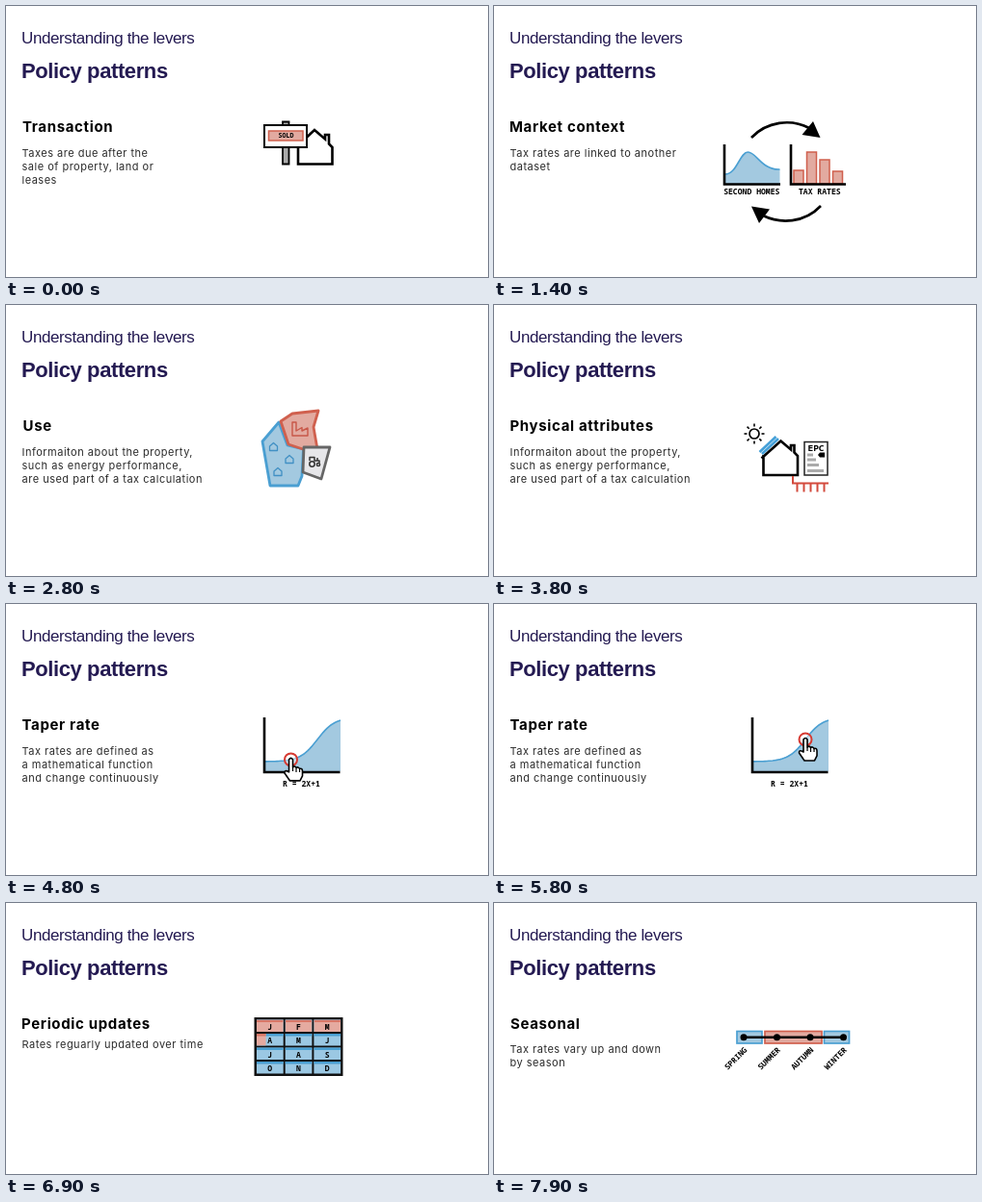
These frames come from a looping animation (500 px wide and 282 px high, 8000 ms). An HTML page:

```html
<!DOCTYPE html>
<html lang="en">
<head>
<meta charset="utf-8">
<title>Policy patterns</title>
<style>
  html, body { margin: 0; width: 100%; height: 100%; overflow: hidden; background: #fff; }
  svg { display: block; width: 100vw; height: 100vh; }
  .intro { font: 17px "Liberation Sans", Arial, sans-serif; letter-spacing: -.4px; fill: #241a52; }
  .main { font: bold 22px "Liberation Sans", Arial, sans-serif; letter-spacing: -.4px; fill: #241a52; }
  .title { font: bold 15px Inter, sans-serif; letter-spacing: .65px; }
  .body { font: 11px Inter, sans-serif; letter-spacing: .5px; fill: #2b2b2b; }
  .mono { font: bold 8.1px "Noto Sans Mono", "DejaVu Sans Mono", monospace; text-anchor: middle; }
  .line { fill: none; stroke: #000; stroke-width: 2.6; }
  .blue { fill: #a3c9e0; stroke: #4a9fd2; }
  .red { fill: #e2aaa0; stroke: #d0604e; }
</style>
</head>
<body>
<svg viewBox="0 0 500 282">
  <text class="intro" x="16" y="39">Understanding the levers</text>
  <text class="main" x="16" y="75">Policy patterns</text>
  <text class="title" id="title" y="130.5"></text>
  <g class="body" id="body"></g>

  <g class="art">
    <path class="line" d="M303 146V164.5H338.5V147L335 143.5V134H331V138.500L320 129L311 137.500"/>
    <path d="M287 120.500H293.500V164.500H287Z" fill="#aaa" stroke="#000" stroke-width="1.8"/>
    <rect x="268" y="124" width="44" height="23" fill="#fff" stroke="#000" stroke-width="2"/>
    <rect class="red" x="272.5" y="130" width="35.500" height="10" stroke-width="1.5"/>
    <text class="mono" x="290.500" y="137.300" style="font-size:6.600px">SOLD</text>
  </g>

  <g class="art">
    <path d="M240 175C252 175 255 152 263.500 152S278 171 296.500 170V185H240Z" fill="#a3c9e0"/>
    <path d="M240 175C252 175 255 152 263.500 152S278 171 296.500 170" fill="none" stroke="#4a9fd2" stroke-width="1.6"/>
    <path class="red" stroke-width="1.500" d="M311 185V171H321V185ZM324.500 185V152H334.500V185ZM338 185V160H348V185ZM351.500 185V172H361.500V185Z"/>
    <path class="line" d="M239 144V185.500H297M308 144V185.500H365"/>
    <path class="line" d="M267 137C283 120 308 117 327 127M339 208C322 226 297 227 279 218"/>
    <path d="M338.500 137L319.500 134L331 120ZM267 208.500L286 211.500L275 226Z"/>
    <text class="mono" x="267.300" y="196.300">SECOND HOMES</text>
    <text class="mono" x="337.800" y="196.300">TAX RATES</text>
  </g>

  <g class="art" stroke-width="2.800" stroke-linejoin="round">
    <path class="blue" d="M266 142L283 122L292 146L308.500 150L307 178L303 188H274Z"/>
    <path class="red" d="M285 121L297 113L324 110L319 127L323 150H308L293 145Z"/>
    <path d="M309 148H336L327 181L308 174Z" fill="#e6e6e9" stroke="#666"/>
    <g id="homes" fill="none" stroke="#4190c4" stroke-width="1.300"></g>
    <path d="M297 122H301V131L307 127.500V131L313 128V136H297Z" fill="none" stroke="#c85748" stroke-width="1.400"/>
    <g fill="none" stroke="#333" stroke-width="1.500">
      <circle cx="317.500" cy="165.500" r="2.700"/><circle cx="324" cy="166" r="1.600"/>
      <path d="M315 162V158.500H320V162H325V164M323 162V159"/>
    </g>
  </g>

  <g class="art">
    <circle cx="270" cy="134" r="5" fill="none" stroke="#000" stroke-width="1.700"/>
    <g id="rays" stroke="#000" stroke-width="1.600"></g>
    <path class="line" style="stroke:#45a0d8" d="M275.500 153L292.500 137M278 155L295 139"/>
    <path class="line" d="M279.500 156V177H315V157L311.500 153.500V146H308V150.500L297.500 141.500L277.500 159.500"/>
    <rect x="322" y="142.500" width="24" height="34.500" fill="#fff" stroke="#222" stroke-width="1.500"/>
    <text class="mono" x="334" y="152" style="font-size:9.500px">EPC</text>
    <path d="M325 156H331M325 161H334M325 166.500H337M325 172.500H342" stroke="#aaa" stroke-width="3"/>
    <path d="M336 156L338 153.500H343V158.500H338Z"/>
    <path class="line" style="stroke:#d34a3d;stroke-width:2" d="M310 178V185.500H347M314.500 185V194.500M321.500 185V194.500M328.500 185V194.500M335.500 185V194.500M342.500 185V194.500"/>
  </g>

  <g class="art">
    <path id="area" fill="#a3c9e0"/>
    <path id="curve" fill="none" stroke="#4a9fd2" stroke-width="1.600"/>
    <path class="line" d="M268 118V175H346.500"/>
    <g id="hand">
      <circle r="6.500" fill="#fff" fill-opacity=".5" stroke="#d63a32" stroke-width="2"/>
      <path d="M-2 0Q0-3 2 0V8Q4 6 5.500 8.500Q7.500 7 9 9.500Q12 8.500 12 12V17L9.500 22H-1L-6.500 14Q-7 10-2 13Z" fill="#fff" stroke="#000" stroke-width="1.600" stroke-linejoin="round"/>
      <path d="M2 8V12M5.500 9V13M9 10V13" stroke="#000" stroke-width="1.200"/>
    </g>
    <text class="mono" x="306.500" y="190">R = 2X+1</text>
  </g>

  <g class="art" id="months"></g>

  <g class="art">
    <g stroke-width="1.700">
      <rect class="blue" x="252" y="133.500" width="26" height="12.500"/>
      <rect class="red" x="281" y="133.500" width="59" height="12.500"/>
      <rect class="blue" x="342.500" y="133.500" width="26" height="12.500"/>
    </g>
    <path class="line" d="M259 139.700H362.500"/>
    <g id="seasons"></g>
  </g>
</svg>

<script>
const LOOP = 8000;
const $ = id => document.getElementById(id);

const survey = ["Informaiton about the property,", "such as energy performance,", "are used part of a tax calculation"];
const slides = [
  { end: 700, title: "Transaction", x: 17, y: 157, lines: ["Taxes are due after the", "sale of property, land or", "leases"] },
  { end: 1800, title: "Market context", x: 16, y: 157, lines: ["Tax rates are linked to another", "dataset"] },
  { end: 2900, title: "Use", x: 17.5, y: 157, lines: survey },
  { end: 4300, title: "Physical attributes", x: 16.5, y: 157, lines: survey },
  { end: 6600, title: "Taper rate", x: 16.5, y: 157, lines: ["Tax rates are defined as", "a mathematical function", "and change continuously"] },
  { end: 7600, title: "Periodic updates", x: 16, y: 150.5, lines: ["Rates reguarly updated over time"] },
  { end: LOOP, title: "Seasonal", x: 17, y: 156, lines: ["Tax rates vary up and down", "by season"] }
];
const arts = [...document.querySelectorAll(".art")];
const curveY = x => 164 - 46 / (1 + Math.exp((323 - x) / 9));

$("homes").innerHTML = [[277.5, 147], [294, 160], [282, 173]].map(([x, y]) =>
  `<path d="M${x - 4} ${y}l4-3.500l4 3.500v4.500h-8Z"/>`).join("");

$("rays").innerHTML = Array.from({ length: 8 }, (_, i) =>
  `<path d="M270 126.500V123.500" transform="rotate(${i * 45} 270 134)"/>`).join("");

const points = Array.from({ length: 40 }, (_, i) => 269 + i * 2).map(x => `${x} ${curveY(x).toFixed(1)}`).join("L");
$("curve").setAttribute("d", "M" + points);
$("area").setAttribute("d", `M${points}V174H269Z`);

$("months").innerHTML = '<rect x="257.500" y="119" width="92" height="61" fill="#111"/>' +
  [..."JFMAMJJASOND"].map((m, i) => {
    const x = 260 + i % 3 * 29.7, y = 121.5 + Math.floor(i / 3) * 14.5;
    const cell = (fill, edge, name) => `<g class="${name}"><rect x="${x}" y="${y}" width="27.700" height="12.500" fill="${fill}"/>
      <rect x="${x}" y="${y}" width="27.700" height="2.500" fill="${edge}"/></g>`;
    return cell("#9bc8e3", "#4a9fd2", "") +
      `<clipPath id="clip${i}"><rect class="wipe" x="${x}" y="${y}" width="0" height="12.500"/></clipPath>
       <g clip-path="url(#clip${i})">${cell("#e5aaa0", "#d87767", "")}</g>
       <text class="mono" x="${x + 13.8}" y="${y + 10}">${m}</text>`;
  }).join("");
const wipes = [...document.querySelectorAll(".wipe")];

$("seasons").innerHTML = ["SPRING", "SUMMER", "AUTUMN", "WINTER"].map((name, i) => {
  const x = 259 + i * 34.5;
  return `<circle cx="${x}" cy="139.700" r="3.500"/>
    <text class="mono" style="text-anchor:end" transform="translate(${x + 4} 153.500) rotate(-45)">${name}</text>`;
}).join("");

let shown = -1;
function show(n) {
  if (n === shown) return;
  shown = n;
  const s = slides[n];
  arts.forEach((a, i) => a.style.display = i === n ? "" : "none");
  $("title").textContent = s.title;
  $("title").setAttribute("x", s.x);
  $("body").innerHTML = s.lines.map((l, i) => `<text x="16.500" y="${s.y + i * 14}">${l}</text>`).join("");
}

function draw(t) {
  show(slides.findIndex(s => t < s.end));
  // the pointer climbs the curve and then rests
  const x = 290 + 44 * Math.min(1, Math.max(0, (t - 4600) / 1600));
  $("hand").setAttribute("transform", `translate(${x} ${curveY(x)})`);
  const done = (t - 6600) / 90;
  wipes.forEach((w, i) => w.setAttribute("width", 27.7 * Math.min(1, Math.max(0, done - i))));
}

const start = performance.now();
function tick() {
  draw((performance.now() - start) % LOOP);
  requestAnimationFrame(tick);
}
tick();
</script>
</body>
</html>
```
